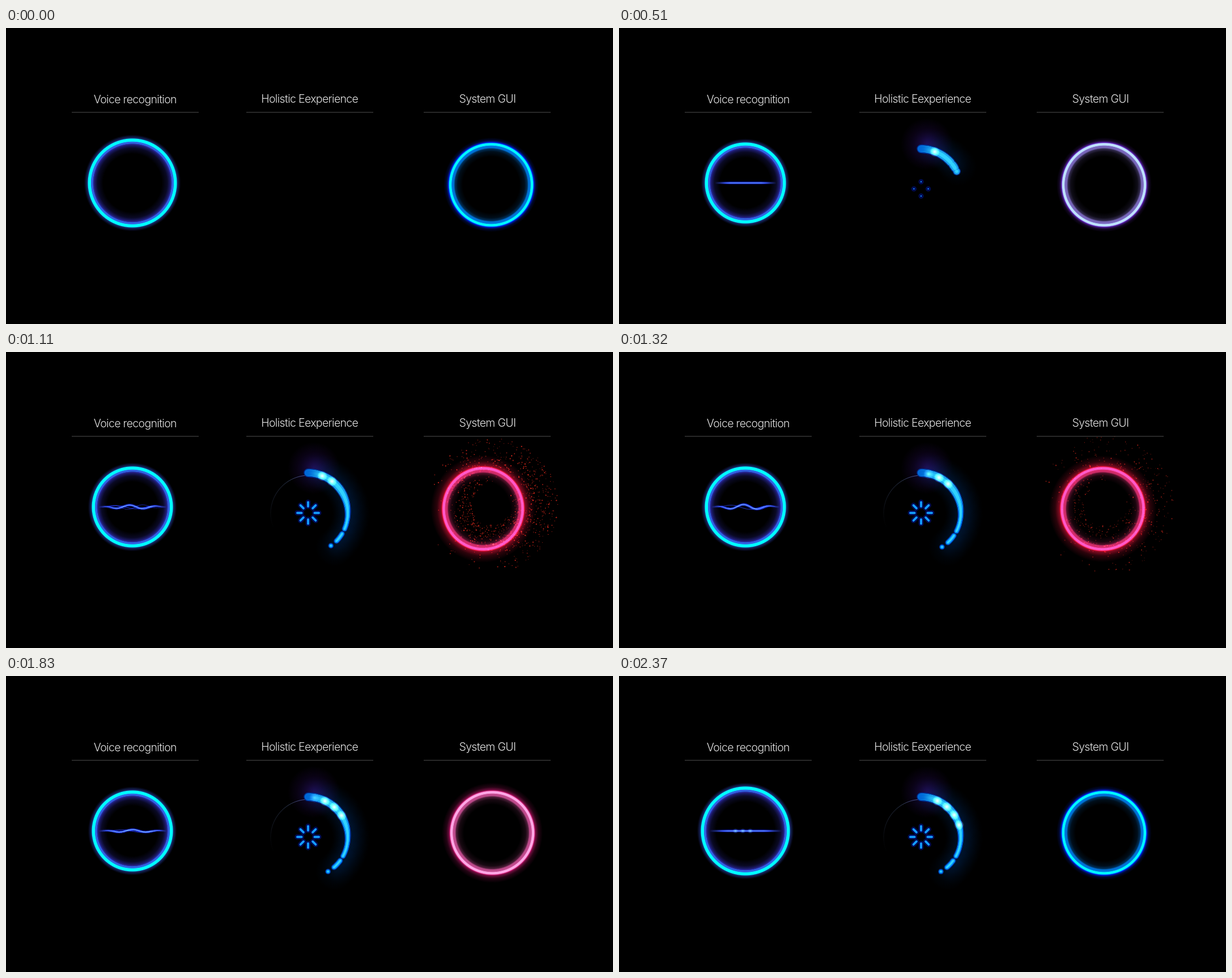
Write an HTML page with a canvas that moves like this. It is 1071 px wide and 523 px high and loops after 2.4 s.

```html
<!DOCTYPE html>
<html>
<head>
<meta charset="utf-8">
<style>
html, body { margin: 0; width: 100%; height: 100%; overflow: hidden; background: #000; }
canvas, svg { position: absolute; left: 0; top: 0; width: 1071px; height: 523px; }
text { font: 300 19.5px Inter, Roboto, sans-serif; letter-spacing: -0.67px; fill: #e2e2e2; text-anchor: middle; }
path { stroke: #505050; }
</style>
</head>
<body>
<canvas width="1071" height="523"></canvas>
<svg viewBox="0 0 1071 523">
  <text x="227.8" y="132.5">Voice recognition</text>
  <text x="535.7" y="132">Holistic Eexperience</text>
  <text x="849.5" y="132">System GUI</text>
  <path d="M116 149H340M424 149H648M737 149H961"/>
</svg>
<script>
const ctx = document.querySelector('canvas').getContext('2d');
const LOOP = 2400, TAU = Math.PI * 2, RAD = Math.PI / 180;

const clamp = v => Math.min(1, Math.max(0, v));
// Smooth step from 0 at a to 1 at b
const ramp = (v, a, b) => {
  const p = clamp((v - a) / (b - a));
  return p * p * (3 - 2 * p);
};
const mix = (c, d, p) => c.map((v, i) => v + (d[i] - v) * p);
const dim = (c, k) => c.map(v => v * k);
const rgba = (c, a = 1) => `rgba(${c.map(Math.round)},${a})`;

function random(seed) {
  return () => (seed = seed * 16807 % 2147483647) / 2147483647;
}

function disc(x, y, r, fill) {
  ctx.fillStyle = fill;
  ctx.beginPath();
  ctx.arc(x, y, r, 0, TAU);
  ctx.fill();
}

function glow(x, y, r, c, a) {
  const g = ctx.createRadialGradient(x, y, 0, x, y, r);
  g.addColorStop(0, rgba(c, a));
  g.addColorStop(0.5, rgba(c, a * 0.4));
  g.addColorStop(1, rgba(c, 0));
  disc(x, y, r, g);
}

// Stops are [distance from the rim, colour, alpha], from inside to outside
function ring(x, y, rx, ry, stops) {
  const end = rx + stops[stops.length - 1][0];
  const g = ctx.createRadialGradient(0, 0, 0, 0, 0, end);
  for (const [d, c, a = 1] of stops) g.addColorStop((rx + d) / end, rgba(c, a));
  ctx.save();
  ctx.translate(x, y);
  ctx.scale(1, ry / rx);
  disc(0, 0, end, g);
  ctx.restore();
}

function fadeStroke(x0, x1, c, a, width) {
  const g = ctx.createLinearGradient(x0, 0, x1, 0);
  g.addColorStop(0, rgba(c, 0));
  g.addColorStop(0.25, rgba(c, a));
  g.addColorStop(0.75, rgba(c, a));
  g.addColorStop(1, rgba(c, 0));
  ctx.strokeStyle = g;
  ctx.lineWidth = width;
  ctx.stroke();
}

function wave(x0, x1, amp, peak, length) {
  ctx.beginPath();
  for (let x = x0; x <= x1; x++) {
    const env = Math.sin(Math.PI * (x - x0) / (x1 - x0));
    ctx.lineTo(x, 273.8 - amp * env * Math.cos(TAU * (x - peak) / length));
  }
}

function voice(t) {
  const grow = ramp(t, 2150, 2340);
  const r = 78.5 - 7 * (ramp(t, 90, 390) - grow);
  const rim = [0, 255, 255], blue = [48, 100, 225], indigo = [44, 42, 165];
  ring(223, 273.8, r, r, [
    [-27, indigo, 0], [-17, indigo, 0.22], [-12, indigo, 0.6], [-9.3, indigo],
    [-8.7, blue], [-5.8, blue], [-5, rim], [-0.5, rim], [0.6, blue, 0.5], [7, indigo, 0]
  ]);

  const half = 60 * ramp(t, 300, 560) + 4 * grow;
  if (half < 2) return;
  const x0 = 223.5 - half, x1 = 223.5 + half;
  const amp = ramp(t, 540, 870) * (1 - ramp(t, 1800, 2280)) * (5.6 + 3.4 * Math.cos(TAU * (t - 870) / 660));
  const dt = (t - 870) / 1000;
  const show = clamp(amp / 2);
  wave(x0, x1, amp, 188 + 14 * dt, 76);
  fadeStroke(x0, x1, [34, 50, 200], 0.8 * show, 1.2);
  wave(x0, x1, amp * 1.3, 266 - 100 * dt, 54);
  fadeStroke(x0, x1, [24, 36, 170], 0.8 * show, 1.1);
  wave(x0, x1, amp, 216 + 7.5 * dt, 49);
  fadeStroke(x0, x1, [20, 40, 230], 0.55, 5);
  fadeStroke(x0, x1, [80, 115, 255], 1, 2);
  for (let i = -1; i <= 1; i++) glow(218.5 + 13 * i, 273.8, 5, [90, 150, 255], 0.7 * grow);
}

// Position on the dial, angle in degrees clockwise from the top
const onDial = (deg, r) => [533 + r * Math.sin(deg * RAD), 285 - r * Math.cos(deg * RAD)];

function band(from, to, width, colour) {
  for (let a = from; a <= to; a += 0.75) {
    disc(...onDial(a, 71.5 - Math.min(a, 90) / 60), width(a) / 2, rgba(colour(a)));
  }
}

function spinner(t, show) {
  ctx.lineCap = 'round';
  for (let i = 0; i < 8; i++) {
    const late = 100 * (i % 2);
    const p = ramp(t, 480 + late, 800);
    const seen = late ? clamp(p * 4) : show;
    const a = i * 45 * RAD, s = Math.sin(a), c = -Math.cos(a);
    const r0 = 12.5 - p, r1 = 12.6 + 6.4 * p;
    ctx.beginPath();
    ctx.moveTo(533 + s * r0, 284.3 + c * r0);
    ctx.lineTo(533 + s * r1, 284.3 + c * r1);
    ctx.strokeStyle = rgba([0, 16, 110], 0.75 * seen);
    ctx.lineWidth = 9;
    ctx.stroke();
    ctx.strokeStyle = rgba([20, 150, 255], seen);
    ctx.lineWidth = 2 + 1.7 * p;
    ctx.stroke();
  }
  ctx.lineCap = 'butt';
}

function dial(t) {
  const end = 150 * (1 - Math.exp(-(t - 395) / 212));
  if (end <= 0) return;
  const show = clamp(end / 40);

  glow(543, 205, 46, [64, 14, 140], 0.45 * show);
  for (let a = 10; a < end; a += 12) glow(...onDial(a, 76), 34, [0, 60, 140], 0.16);

  // Faint circle sweeping back from the top
  const sweep = 110 * ramp(t, 650, 1110);
  ctx.lineWidth = 1;
  for (let a = 0; a < sweep; a += 3) {
    ctx.strokeStyle = rgba([110, 135, 200], 0.6 * (1 - a / sweep) ** 1.3);
    ctx.beginPath();
    ctx.arc(534, 285, 67, (-93 - a) * RAD, (-90 - a) * RAD);
    ctx.stroke();
  }

  // Main arc, dash and dot, each with a dark edge, a body and a bright core
  ctx.globalCompositeOperation = 'source-over';
  const gap = clamp(end / 130);
  const parts = [[0, end - 31 * gap], [end - 24 * gap, end - 10 * gap], [end, end]];
  const width = a => 7 + 5.5 * (1 - ramp(a, 45, 105));
  const body = a => mix([0, 105, 215], mix([30, 165, 235], [0, 140, 255], ramp(a, 50, 100)), ramp(a, 0, 22));
  const core = a => mix(body(a), [50, 210, 255], ramp(a, 5, 30));
  for (const p of parts) band(...p, a => width(a) + 3, () => [0, 42, 135]);
  for (const p of parts) band(...p, width, body);
  for (const p of parts) band(...p, a => width(a) * 0.5, core);
  ctx.globalCompositeOperation = 'lighter';

  // Bright spots drifting along the arc
  for (let i = 0; i < 4; i++) {
    const a = 30 - 16 * i + 28 * (t - 870) / 1000;
    const p = clamp((a - 6) / 10) * clamp((end - 20 - a) / 10);
    glow(...onDial(a, 70.5), 9, [200, 245, 255], p);
  }
  spinner(t, show);
}

const rnd = random(77);
const dust = Array.from({ length: 1300 }, (_, i) => {
  const inner = i % 5 < 2, spread = (rnd() + rnd() - 1) * Math.PI;
  return {
    a: (inner ? 2.1 : -0.3) + spread,
    r: inner ? 34 + 36 * rnd() : 66 + 50 * rnd() ** 1.3,
    size: 0.6 + 0.6 * rnd() ** 3,
    light: 0.35 + 0.65 * rnd(),
    rank: rnd(),
    turn: rnd() - 0.5
  };
});

// Edge and core colour of each phase
const blue = [[0, 40, 255], [0, 250, 255]];
const violet = [[100, 35, 190], [190, 225, 255]];
const red = [[240, 20, 60], [255, 88, 200]];
const pink = [[165, 25, 155], [255, 235, 255]];

function tone(t, i) {
  let c = mix(blue[i], violet[i], ramp(t, 150, 480));
  c = mix(c, red[i], ramp(t, 540, 720));
  c = mix(c, pink[i], ramp(t, 1600, 2040));
  return mix(c, blue[i], ramp(t, 2130, 2360));
}

function system(t) {
  const amount = ramp(t, 580, 800) * (1 - ramp(t, 800, 1750));
  const spread = 0.68 + 0.32 * ramp(t, 570, 870) + 0.12 * ramp(t, 870, 1750);
  for (const d of dust) {
    if (d.rank > amount) continue;
    const a = d.a + d.turn * (t - 870) / 1500, r = d.r * spread;
    disc(856 + r * Math.cos(a), 271 + r * Math.sin(a), d.size, rgba([255, 45, 30], d.light * Math.sqrt(amount)));
  }

  // The blow pushes the ring aside and it springs back
  const u = Math.max(0, t - 560) / 1000;
  const shift = -77 * Math.exp(-2.86 * u) * Math.sin(3.74 * u);
  const rx = 75 - shift * shift / 80;
  const edge = tone(t, 0), core = tone(t, 1);
  const mid = dim(mix(edge, core, 0.45), 0.88), fade = dim(mid, 0.55);
  const halo = 9 + 11 * ramp(t, 540, 720) * (1 - ramp(t, 1600, 2040));
  ring(856 + shift, 277, rx, 74.5, [
    [-25, fade, 0], [-16, fade, 0.22], [-11, fade, 0.75], [-9.5, mid, 0.9], [-6.6, mid],
    [-5.6, mid], [-4.8, core], [-1.3, core], [0, edge], [1.5, edge, 0.55],
    [halo * 0.45, edge, 0.18], [halo, edge, 0]
  ]);
}

function draw(t) {
  ctx.globalCompositeOperation = 'source-over';
  ctx.fillStyle = '#000';
  ctx.fillRect(0, 0, 1071, 523);
  ctx.globalCompositeOperation = 'lighter';
  voice(t);
  dial(t);
  system(t);
}

const began = performance.now();
function tick() {
  draw((performance.now() - began) % LOOP);
  requestAnimationFrame(tick);
}
tick();
</script>
</body>
</html>
```
